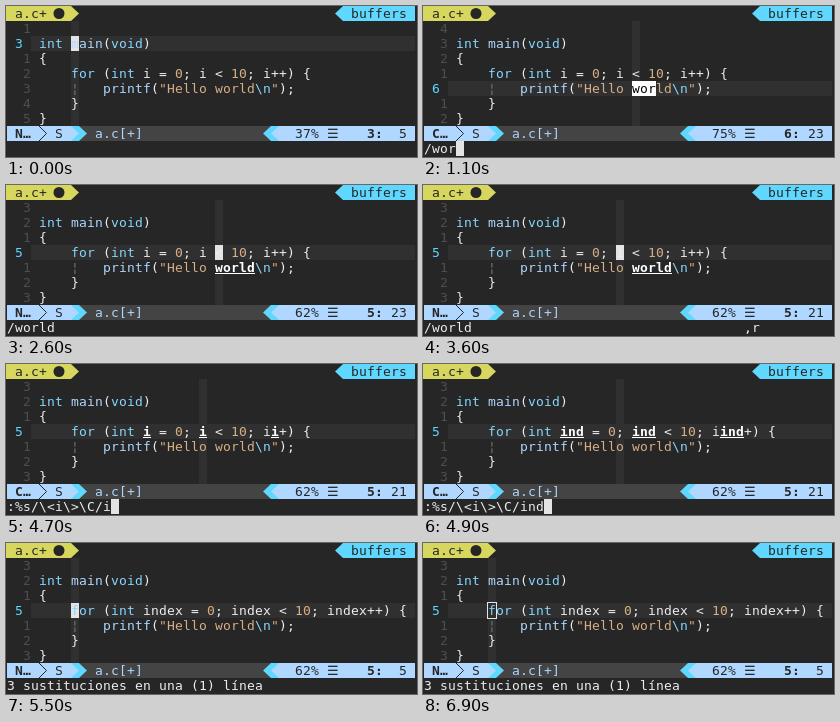
These frames come from a looping animation (411x151 px, 7 s). An HTML page with a canvas:

```html
<!DOCTYPE html>
<html lang="es">
<head>
<meta charset="utf-8">
<title>Editor</title>
<style>
html, body { margin: 0; width: 100%; height: 100%; overflow: hidden; background: #262626; }
canvas { display: block; width: 411px; height: 151px; }
</style>
</head>
<body>
<canvas id="stage"></canvas>
<script>
const W = 411, H = 151, CW = 8, RH = 15, PAD = 1, LOOP = 7000;
const STATUS = 8, CMD = 9, GUTTER = 4;
const C = {
  bg: '#262626', line: '#303030', dim: '#4e4e4e', fg: '#eeeeee', white: '#ffffff',
  cursor: '#e4e4e4', cyan: '#5fd7ff', pale: '#afd7ff', key: '#87d7ff',
  value: '#d7af87', grey: '#444444', tab: '#d7d75f'
};

const canvas = document.getElementById('stage');
const ctx = canvas.getContext('2d');
const scale = window.devicePixelRatio || 1;
canvas.width = W * scale;
canvas.height = H * scale;
ctx.scale(scale, scale);

const px = col => PAD + col * CW;

function cells(col, row, n, color) {
  ctx.fillStyle = color;
  ctx.fillRect(px(col), row * RH, n * CW, RH);
}

// One glyph per grid cell, as a terminal does.
function text(str, col, row, color, bold = false) {
  ctx.font = (bold ? 'bold ' : '') + '13px "DejaVu Sans Mono", "DejaVu Sans", monospace';
  ctx.fillStyle = color;
  [...str].forEach((ch, i) => {
    if (ch !== ' ') ctx.fillText(ch, px(col + i), row * RH + 12);
  });
}

// Powerline wedge; dir 1 points right, -1 points left.
function wedge(col, row, dir, color, back) {
  cells(col, row, 1, back);
  const base = px(dir > 0 ? col : col + 1), y = row * RH;
  ctx.fillStyle = color;
  ctx.beginPath();
  ctx.moveTo(base, y);
  ctx.lineTo(base + dir * CW, y + RH / 2);
  ctx.lineTo(base, y + RH);
  ctx.fill();
}

const source = name => [
  '', 'int main(void)', '{',
  `    for (int ${name} = 0; ${name} < 10; ${name}++) {`,
  '    ¦   printf("Hello world\\n");'.slice(0),
  '    }', '}'
];

const TOKENS = /"[^"\\]*|\\n|\b(?:int|void|for)\b|\b(?:main|printf)\b|\d+|¦|[^]/g;

function tokenColor(t) {
  if (t[0] === '"' || /^\d/.test(t)) return C.value;
  if (t === '\\n' || /^(int|void|for)$/.test(t)) return C.key;
  if (t === 'main' || t === 'printf') return C.pale;
  return t === '¦' ? '#767676' : C.fg;
}

function codeLine(str, row) {
  // The closing quote of the string must not swallow the rest of the line.
  const parts = str.replace(/\\n"/, '\\n\u0001').match(TOKENS) || [];
  let col = GUTTER;
  for (const p of parts) {
    const t = p === '\u0001' ? '"' : p;
    text(t, col, row, tokenColor(t));
    col += t.length;
  }
}

function emphasis(word, col, row) {
  text(word, col, row, C.white, true);
  ctx.fillStyle = C.white;
  ctx.fillRect(px(col), row * RH + 13, word.length * CW, 1);
}

const base = { line: 3, col: 5, mode: 'N', cmd: '', keys: '', name: 'i', cursor: 'block' };
const find = { line: 6, col: 23, mode: 'C', cursor: 'cmd' };
const search = n => ({ ...find, cmd: '/' + 'world'.slice(0, n), match: n });
const RENAME = ':%s/\\<i\\>\\C/';
const rename = n => ({
  cmd: RENAME + 'index'.slice(0, n), name: 'index'.slice(0, n),
  mode: 'C', cursor: 'cmd', found: false, preview: true
});

// Each step overrides the state left by those before it.
const STEPS = [
  [400, { keys: '/' }],
  [700, { keys: '', mode: 'C', cmd: '/', cursor: 'cmd' }],
  [900, search(2)],
  [1100, search(3)],
  [1300, search(4)],
  [1400, search(5)],
  [1500, { match: 0, found: true, cursor: 'tail' }],
  [1600, { mode: 'N', cursor: 'block' }],
  [2600, { line: 5 }],
  [3000, { col: 21 }],
  [3400, { keys: ',' }],
  [3600, { keys: ',r' }],
  [3800, { keys: '', cmd: RENAME, cursor: 'cmd' }],
  [4700, rename(1)],
  [4800, rename(2)],
  [4900, rename(3)],
  [5100, rename(4)],
  [5200, rename(5)],
  [5500, { mode: 'N', col: 5, cursor: 'block', preview: false,
           cmd: '3 sustituciones en una (1) línea' }],
  [6900, { cursor: 'hollow' }]
];

function stateAt(t) {
  return STEPS.reduce((s, [at, change]) => t >= at ? Object.assign(s, change) : s, { ...base });
}

function drawTabs() {
  ctx.fillStyle = C.tab;
  ctx.fillRect(0, 0, px(8), RH);
  text('a.c+', 1, 0, C.bg);
  ctx.beginPath();
  ctx.arc(53, 7.5, 5.5, 0, Math.PI * 2);
  ctx.fill();
  wedge(8, 0, 1, C.tab, C.bg);
  wedge(41, 0, -1, C.cyan, C.bg);
  cells(42, 0, 9, C.cyan);
  text('buffers', 43, 0, C.bg);
}

function drawCode(s) {
  const cur = s.line - 1, at = GUTTER + s.col - 1;
  cells(3, cur, 48, C.line);
  ctx.fillRect(px(at), RH, CW, RH * 7);
  if (s.match) cells(26, 5, s.match, C.white);
  if (s.cursor === 'block') cells(at, cur, 1, C.cursor);
  if (s.cursor === 'tail') cells(31, 5, 1, C.cursor);

  source(s.name).forEach((str, i) => {
    const row = i + 1, gap = Math.abs(row - cur);
    if (gap) text(String(gap), 2, row, C.dim);
    else text(String(s.line), 1, row, C.cyan);
    codeLine(str, row);
  });

  if (s.match) {
    cells(26, 5, s.match, C.white);
    text('world'.slice(0, s.match), 26, 5, '#000000');
  }
  if (s.found) {
    cells(26, 5, 5, cur === 5 ? C.line : C.bg);
    if (s.cursor === 'block' && cur === 5) cells(26, 5, 1, C.cursor);
    emphasis('world', 26, 5);
  }
  if (s.preview) {
    const n = s.name.length;
    [17, 23 + n, 31 + 2 * n].forEach(col => {
      cells(col, 4, n, C.line);
      emphasis(s.name, col, 4);
    });
  }
  if (s.cursor === 'hollow') {
    ctx.strokeStyle = C.cursor;
    ctx.lineWidth = 1;
    ctx.strokeRect(px(at) - 0.5, cur * RH - 0.5, CW + 1, RH + 1);
  }
}

function drawStatus(s) {
  const y = STATUS * RH;
  cells(0, STATUS, 51, C.grey);
  cells(0, STATUS, 8, C.pale);
  text(s.mode + '…', 1, STATUS, C.bg, true);
  ctx.strokeStyle = C.bg;
  ctx.lineWidth = 1;
  ctx.beginPath();
  ctx.moveTo(px(4), y);
  ctx.lineTo(px(5) - 0.5, y + RH / 2);
  ctx.lineTo(px(4), y + RH);
  ctx.stroke();
  text('S', 6, STATUS, C.bg);
  wedge(8, STATUS, 1, C.pale, C.cyan);
  wedge(9, STATUS, 1, C.cyan, C.grey);
  text('a.c[+]', 11, STATUS, C.pale);

  wedge(32, STATUS, -1, C.cyan, C.grey);
  wedge(33, STATUS, -1, C.pale, C.cyan);
  cells(34, STATUS, 17, C.pale);
  text(Math.floor(s.line / 8 * 100) + '% ☰', 36, STATUS, C.bg);
  text(s.line + ':', 45, STATUS, C.bg, true);
  text(String(s.col).padStart(3), 47, STATUS, C.bg);
}

function drawCommand(s) {
  text(s.cmd, 0, CMD, C.fg);
  text(s.keys, 40, CMD, C.fg);
  if (s.cursor === 'cmd') cells(s.cmd.length, CMD, 1, C.cursor);
}

function draw(t) {
  const s = stateAt(t);
  ctx.fillStyle = C.bg;
  ctx.fillRect(0, 0, W, H);
  drawCode(s);
  drawTabs();
  drawStatus(s);
  drawCommand(s);
}

const start = performance.now();
function tick() {
  draw((performance.now() - start) % LOOP);
  requestAnimationFrame(tick);
}
tick();
</script>
</body>
</html>
```
